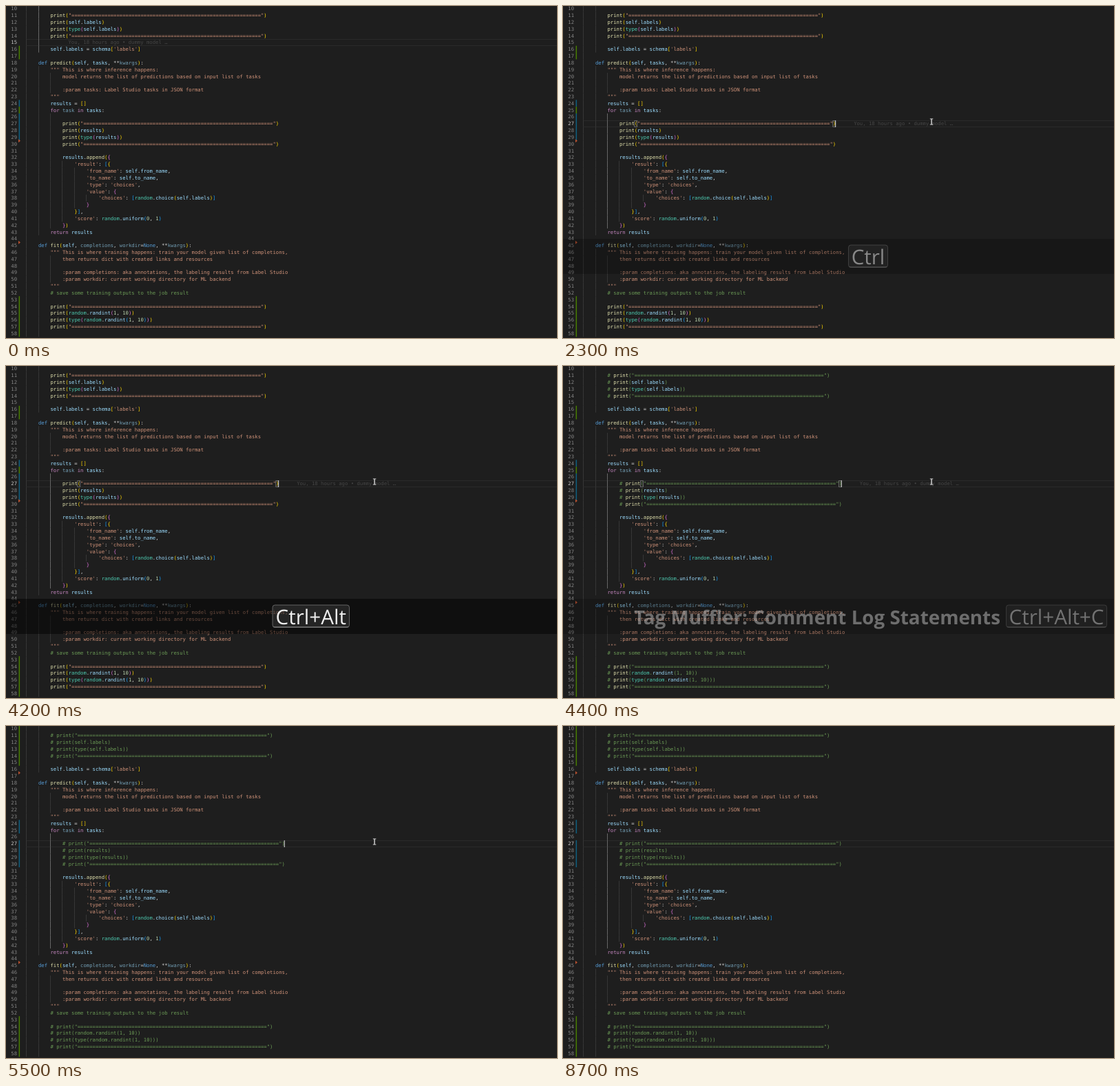
These frames come from a looping animation (800x482 px, 8.8 s). An HTML page with a canvas:

```html
<!DOCTYPE html>
<html lang="en">
<head>
<meta charset="utf-8">
<title>Commenting print statements</title>
<style>
  html, body { margin: 0; width: 100%; height: 100%; overflow: hidden; background: #1e1e1e; }
  canvas { display: block; }
</style>
</head>
<body>
<canvas id="stage" width="800" height="482"></canvas>
<script>
const ctx = document.getElementById('stage').getContext('2d');
ctx.textRendering = 'geometricPrecision';

const LOOP = 8800, STEP = 100;
const FIRST = 10, LINE_H = 9.826, CODE_X = 29.55, CHAR_W = 4.364;
const CODE_FONT = '7.25px "DejaVu Sans Mono", monospace';
const KEY_FONT = '29.6px "Open Sans", sans-serif';
const TITLE_FONT = 'bold 27.8px "Open Sans", sans-serif';
const BLAME = 'You, 18 hours ago • dummy model …';

const COLOR = {
  text: '#d4d4d4', string: '#ce9178', comment: '#6a9955', func: '#dcdcaa',
  keyword: '#569cd6', control: '#c586c0', type: '#4ec9b0', number: '#b5cea8',
  variable: '#9cdcfe', unused: '#729db3', added: '#487e02', modified: '#0f5f80', deleted: '#b5502f'
};
const BRACKETS = ['#ffd700', '#da70d6', '#179fff'];

const SOURCE = `
        print("RULE")
        print(self.labels)
        print(type(self.labels))
        print("RULE")

        self.labels = schema['labels']

    def predict(self, tasks, **kwargs):
        """ This is where inference happens:
            model returns the list of predictions based on input list of tasks

            :param tasks: Label Studio tasks in JSON format
        """
        results = []
        for task in tasks:

            print("RULE")
            print(results)
            print(type(results))
            print("RULE")

            results.append({
                'result': [{
                    'from_name': self.from_name,
                    'to_name': self.to_name,
                    'type': 'choices',
                    'value': {
                        'choices': [random.choice(self.labels)]
                    }
                }],
                'score': random.uniform(0, 1)
            })
        return results

    def fit(self, completions, workdir=None, **kwargs):
        """ This is where training happens: train your model given list of completions,
            then returns dict with created links and resources

            :param completions: aka annotations, the labeling results from Label Studio
            :param workdir: current working directory for ML backend
        """
        # save some training outputs to the job result

        print("RULE")
        print(random.randint(1, 10))
        print(type(random.randint(1, 10)))
        print("RULE")
`.replace(/RULE/g, '='.repeat(63)).split('\n');

const lineTop = n => 8.6 + (n - 11) * LINE_H;
const baseline = n => lineTop(n) + 7.5;
const colX = col => CODE_X + col * CHAR_W;

function wordColor(word, rest) {
  if (/^(def|None)$/.test(word)) return COLOR.keyword;
  if (/^(for|in|return)$/.test(word)) return COLOR.control;
  if (/^(random|type)$/.test(word)) return COLOR.type;
  if (/^\d/.test(word)) return COLOR.number;
  if (/^(choice|uniform|randint)$/.test(word)) return COLOR.variable;
  if (rest[0] === '(') return COLOR.func;
  if (/^(task|completions|workdir|kwargs)$/.test(word)) return COLOR.unused;
  return COLOR.variable;
}

// Split each line into coloured tokens, tracking docstrings and bracket depth.
function parse(source) {
  let doc = false, depth = 0;
  const lines = source.map((raw, i) => {
    const body = raw.trim(), indent = raw.search(/\S|$/);
    const line = { n: FIRST + i, indent, body, tokens: [], print: body.startsWith('print(') };
    const fence = body.startsWith('"""');
    if (doc || fence) {
      line.tokens.push({ col: indent, text: body, color: COLOR.string });
      if (fence) doc = !doc;
      return line;
    }
    if (body[0] === '#') {
      line.tokens.push({ col: indent, text: body, color: COLOR.comment });
      return line;
    }
    for (const m of body.matchAll(/'[^']*'|"[^"]*"|\w+|\S/g)) {
      const text = m[0], rest = body.slice(m.index + text.length);
      let color = COLOR.text, word = false;
      if (/^['"]/.test(text)) color = COLOR.string;
      else if (/^\w/.test(text)) { color = wordColor(text, rest); word = /^\D/.test(text); }
      else if (/[([{]/.test(text)) color = BRACKETS[depth++ % 3];
      else if (/[)\]}]/.test(text)) color = BRACKETS[--depth % 3];
      line.tokens.push({ col: indent + m.index, text, color, word });
    }
    return line;
  });
  // Blank lines take their guides from the line below.
  for (let i = lines.length - 1; i >= 0; i--) {
    const below = lines[i + 1];
    lines[i].guides = lines[i].body ? lines[i].indent : below ? below.guides : 8;
  }
  return lines;
}
const lines = parse(SOURCE);

function rect(x, y, w, h, color) {
  ctx.fillStyle = color;
  ctx.fillRect(x, y, w, h);
}

function label(text, x, y, color) {
  ctx.fillStyle = color;
  ctx.fillText(text, x, y);
}

function drawLine(line, commented, settled) {
  const { n, indent, body } = line;
  if (!line.print || !commented) {
    for (const k of line.tokens) label(k.text, colX(k.col), baseline(n), k.color);
  } else if (settled) {
    label('# ' + body, colX(indent), baseline(n), COLOR.comment);
  } else {
    label('#', colX(indent), baseline(n), COLOR.comment);
    for (const k of line.tokens)
      label(k.text, colX(k.col + 2), baseline(n), k.word ? k.color : COLOR.comment);
  }
}

function drawGuides(clicked) {
  const [col, from, to] = clicked ? [8, 26, 42] : [4, 10, 16];
  for (const { n, guides } of lines) {
    for (let c = 0; c < guides; c += 4) {
      const active = c === col && n >= from && n <= to;
      rect(Math.floor(colX(c)), lineTop(n), 1, LINE_H, active ? '#666' : '#363636');
    }
  }
}

function drawGutter(saved) {
  const bar = (from, to, color) =>
    rect(18.6, lineTop(from), 1.5, (to - from + 1) * LINE_H, color);
  const notch = n => {
    const y = lineTop(n);
    ctx.fillStyle = COLOR.deleted;
    ctx.beginPath();
    ctx.moveTo(18, y - 2);
    ctx.lineTo(21, y + .5);
    ctx.lineTo(18, y + 3);
    ctx.fill();
  };
  if (saved) {
    bar(10, 15, COLOR.added);
    bar(24, 25, COLOR.modified);
    bar(27, 30, COLOR.modified);
    notch(17);
  } else {
    bar(16, 17, COLOR.added);
    bar(24, 24, COLOR.modified);
    bar(25, 25, COLOR.added);
    bar(26, 29, COLOR.modified);
    notch(30);
  }
  bar(53, 58, COLOR.added);
  notch(45);
}

function caretOn(t) {
  if (t < 1200) return t >= 500 && t < 1000;
  if (t < 1600) return true;
  if (t < 4400) return Math.floor((t - 2100) / 500) % 2 === 0;
  return t < 8700 && Math.floor((t - 4400) / 500) % 2 === 0;
}

function pointer(t) {
  if (t < 100) return null;
  if (t < 900) {
    const p = 1 - (1 - (t - 100) / 800) ** 2;
    return [300 + 235 * p, 464 - 296 * p];
  }
  if (t < 6300) return [535, 168];
  if (t < 6400) return [195, 355];
  if (t < 7200) return null;
  if (t < 7400) return [517, 168];
  if (t < 7600) {
    const p = (t - 7300) / 200;
    return [517 - 405 * p, 168 + 50 * p];
  }
  return null;
}

function drawPointer([x, y]) {
  rect(x - .6, y - 4, 1.3, 8, '#e8e8e8');
  rect(x - 2.2, y - 4.6, 4.5, 1, '#ccc');
  rect(x - 2.2, y + 3.6, 4.5, 1, '#ccc');
}

function drawKeys(keys, x, w, alpha, title) {
  ctx.save();
  ctx.globalAlpha = alpha;
  rect(0, 338, 800, 51, 'rgba(0,0,0,.5)');
  if (title) {
    ctx.font = TITLE_FONT;
    ctx.textAlign = 'right';
    label(title, x - 8, 374.5, '#eee');
  }
  ctx.beginPath();
  ctx.roundRect(x + .5, 347, w - 1, 32.5, 3.5);
  ctx.fillStyle = 'rgba(222,222,222,.1)';
  ctx.fill();
  ctx.strokeStyle = 'rgba(204,204,204,.4)';
  ctx.lineWidth = 1;
  ctx.stroke();
  rect(x + 2, 378, w - 4, 1.5, 'rgba(187,187,187,.35)');
  ctx.font = KEY_FONT;
  ctx.textAlign = 'center';
  label(keys, x + w / 2, 374.5, '#eee');
  ctx.restore();
}

function drawOverlay(t) {
  const fade = start => Math.min(1, (t - start) / 200);
  if (t >= 2300 && t < 2600) drawKeys('Ctrl', 414, 58, fade(2200));
  else if (t >= 2600 && t < 4300) drawKeys('Ctrl+Alt', 386.5, 112.5, 1);
  else if (t >= 4400 && t < 5300)
    drawKeys('Ctrl+Alt+C', 643, 147, fade(4320), 'Tag Muffler: Comment Log Statements');
}

function draw(t) {
  const clicked = t >= 1200, commented = t >= 4400;
  const settled = t >= 4500, saved = t >= 4700;
  const active = clicked ? 27 : 15;
  const shift = commented ? 2 : 0;
  const caretX = colX(clicked ? 84 + shift : 8);

  rect(0, 0, 800, 482, '#1e1e1e');
  const y = Math.round(lineTop(active));
  rect(30, y, 770, 1, '#2a2a2a');
  rect(30, y + 9, 770, 1, '#2a2a2a');
  drawGuides(clicked);
  drawGutter(saved);

  ctx.font = CODE_FONT;
  for (const line of lines) {
    const { n } = line;
    label(n, 7.3, baseline(n), n === active ? '#c6c6c6' : '#858585');
    drawLine(line, commented, settled);
  }
  if (!saved) label(BLAME, caretX + 26, baseline(active), '#454545');

  if (clicked && !settled) {
    ctx.strokeStyle = '#888';
    ctx.lineWidth = .7;
    for (const col of [17, 83])
      ctx.strokeRect(colX(col + shift), y + .7, CHAR_W - .3, 8.6);
  }
  if (caretOn(t)) rect(caretX - 1.2, y, 1.2, 10, '#c4c5c3');

  const p = pointer(t);
  if (p) drawPointer(p);
  drawOverlay(t);
}

const start = performance.now();
let shown = -1;
function tick() {
  const t = Math.floor((performance.now() - start) % LOOP / STEP) * STEP;
  if (t !== shown) draw(shown = t);
  requestAnimationFrame(tick);
}
tick();
</script>
</body>
</html>
```
